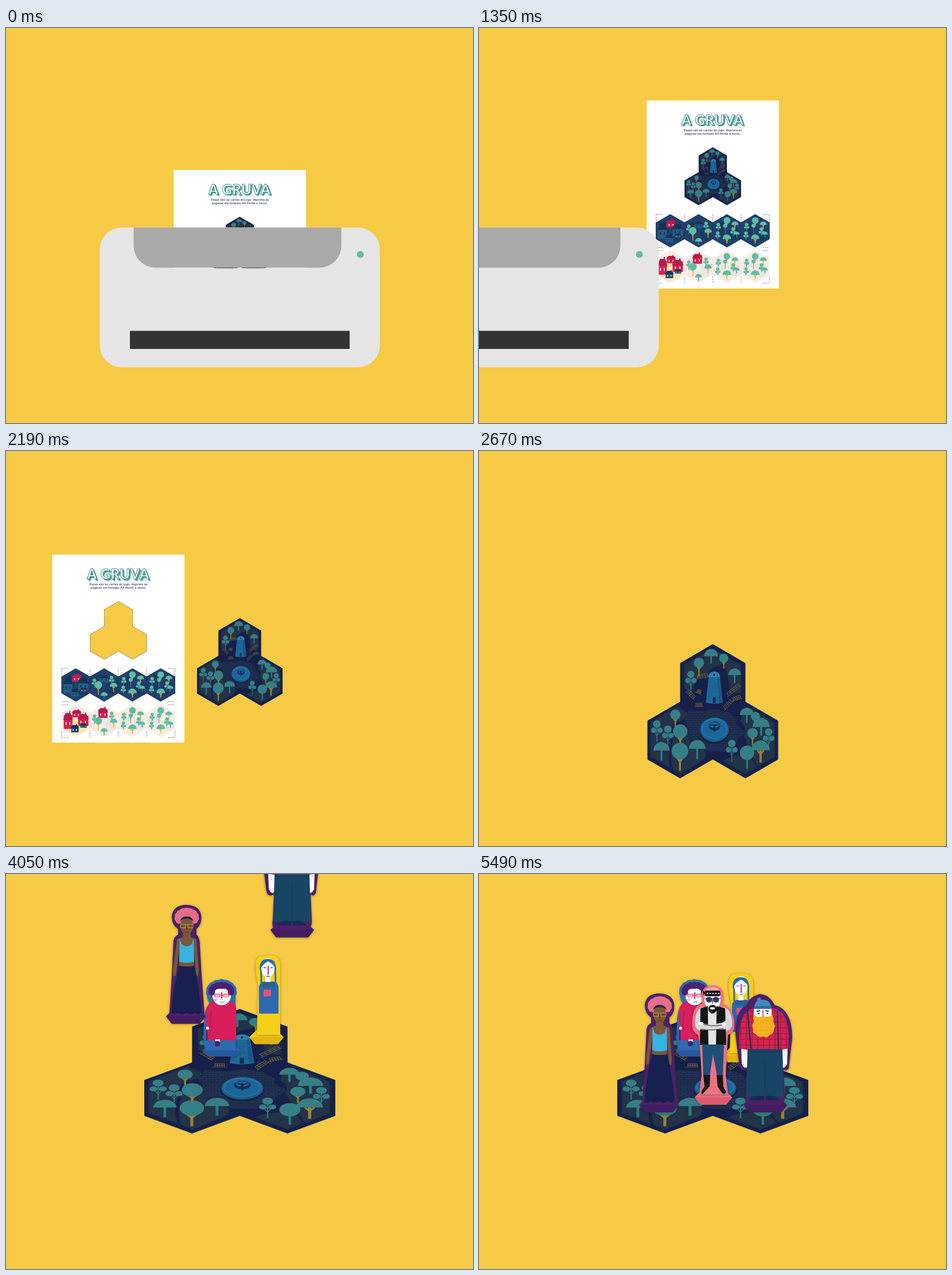
An HTML page with a canvas that plays this animation: 814x688 px, repeating every 5520 ms.

```html
<!DOCTYPE html>
<html lang="pt">
<head>
<meta charset="utf-8">
<title>Cartas do jogo</title>
<style>
html, body { margin: 0; width: 100%; height: 100%; overflow: hidden; background: #f6ca45; }
canvas { display: block; width: 814px; height: 688px; }
</style>
</head>
<body>
<canvas id="stage"></canvas>
<script>
const W = 814, H = 688, LOOP = 5520, STEP = 30;
const canvas = document.getElementById('stage');
const c = canvas.getContext('2d');
const dpr = window.devicePixelRatio || 1;
canvas.width = W * dpr;
canvas.height = H * dpr;

const YELLOW = '#f6ca45', NAVY = '#15204b', PURPLE = '#4b2069';

// ---------- helpers ----------
function ease(t, from, to) {
  const p = Math.min(1, Math.max(0, (t - from) / (to - from)));
  return p * p * (3 - 2 * p);
}
const mix = (a, b, p) => a + (b - a) * p;

function at(x, y, sx, sy, draw) {
  c.save();
  c.translate(x, y);
  c.scale(sx, sy);
  draw();
  c.restore();
}
function fill(color, d) {
  c.fillStyle = color;
  c.fill(new Path2D(d));
}
function line(color, width, d) {
  c.strokeStyle = color;
  c.lineWidth = width;
  c.stroke(new Path2D(d));
}
function oval(color, x, y, rx, ry = rx) {
  c.fillStyle = color;
  c.beginPath();
  c.ellipse(x, y, rx, ry, 0, 0, 7);
  c.fill();
}
function rect(color, x, y, w, h, r = 0) {
  c.fillStyle = color;
  c.beginPath();
  c.roundRect(x, y, w, h, r);
  c.fill();
}

// ---------- trees and houses ----------
// each tree: kind, x, y, radius, foot of the trunk, golden trunk
function trees(list, leaf, teal, gold) {
  for (const [kind, x, y, r, foot, golden] of list) {
    const w = Math.max(1, r * 0.24);
    const base = y + r * (kind === 'dome' ? .29 : .85);
    rect(golden ? gold : teal, x - w / 2, y, w, foot - y);
    if (golden) line(gold, w * .7, `M${x - r * .35} ${base}L${x} ${base + r * .45}L${x + r * .35} ${base}`);
    if (kind === 'dome') {
      fill(leaf, `M${x - r} ${base}A${r} ${r * 1.05} 0 0 1 ${x + r} ${base}Z`);
    } else {
      oval(leaf, x, y, r);
    }
    if (kind === 'trio') {
      line(teal, w * .7, `M${x - r * .8} ${y + r * 1.8}Q${x} ${y + r * 3.4} ${x} ${y + r * 3}Q${x} ${y + r * 3.4} ${x + r * .8} ${y + r * 1.8}`);
      oval(leaf, x - r * .85, y + r * 1.7, r * .72);
      oval(leaf, x + r * .85, y + r * 1.7, r * .72);
    }
  }
}
function house(x, y, w, h, wall, roof, pane) {
  rect(wall, x, y, w, h);
  fill(roof, `M${x - 1} ${y + h * .35}L${x + w * .2} ${y - h * .15}H${x + w * .8}L${x + w + 1} ${y + h * .35}Z`);
  rect(roof, x + w * .65, y - h * .3, w * .12, h * .3);
  rect(pane, x + w * .2, y + h * .5, w * .12, h * .22);
  rect(pane, x + w * .65, y + h * .5, w * .12, h * .22);
}

// ---------- three-hexagon board, centred on 0,0 ----------
const BOARD = 'M0 -116.5L56.7 -83.5V-16.5L113.5 16.5V83.5L56.7 116.5L0 83.5L-56.7 116.5L-113.5 83.5V16.5L-56.7 -16.5V-83.5Z';
const GROVE_TOP = [
  ['dome', -3, -99, 12, -83], ['disc', 19, -92, 8, -74, 1], ['disc', -24, -84, 9, -61, 1],
  ['trio', -38, -64, 6.3, -33], ['dome', 38, -66, 11, -49]
];
const GROVE_LEFT = [
  ['trio', -97, 22, 6.5, 53], ['trio', -78, 31, 6.5, 58], ['disc', -65, 6, 9, 29, 1],
  ['disc', -56.5, 35, 12.5, 60, 1], ['dome', -89, 64, 14, 86], ['dome', -27, 61, 14.5, 83],
  ['disc', -57, 69, 14.5, 103, 1]
];
const GROVE_RIGHT = [
  ['dome', 59, 3, 12, 20], ['disc', 74, 9, 8, 28, 1], ['dome', 84, 23, 15, 42],
  ['disc', 69, 38, 9, 59, 1], ['trio', 97, 36, 6.5, 59], ['trio', 33, 56, 6.5, 88],
  ['dome', 83, 63, 16, 89, 1], ['disc', 59.5, 72, 12.5, 100]
];
// fallen sails: x, y, angle, length
const SAILS = [[-18, -61, -.15, 18], [36, -37, -.65, 26], [26, -12, -.8, 17], [42, -23, -.3, 13],
  [-24, -11, 0, 11], [-38, -29, .75, 16], [-24, -34, .4, 7]];

function sail([x, y, angle, len]) {
  c.save();
  c.translate(x, y);
  c.rotate(angle);
  let d = `M${-len / 2 - 3} 3H${len / 2 + 2}M${-len / 2} 0H${len / 2}M${-len / 2} -3H${len / 2}`;
  for (let i = 0; i < 5; i++) d += `M${len * (i / 4 - .5)} -3V3`;
  line('#7d692f', .8, d);
  c.restore();
}

function bricks() {
  c.save();
  c.clip(new Path2D('M-42 -2L-18 0L6 -4L28 2L42 14L40 22L56 36L44 48L40 58L20 70L-10 70L-28 52L-46 48L-44 26L-50 14Z'));
  rect('#223150', -60, -10, 130, 90);
  let d = '';
  for (let y = -4, row = 0; y < 74; y += 4, row++) {
    d += `M-60 ${y}H60`;
    for (let x = -58 + row % 2 * 4; x < 60; x += 8) d += `M${x} ${y}v4`;
  }
  line('#182549', .7, d);
  c.restore();
}

function board() {
  fill(NAVY, BOARD);
  fill('#233348', 'M-50 -80L0 -109L20 -97L14 -80Q0 -78 -10 -66Q-30 -58 -34 -40Q-44 -30 -49 -42Z');
  fill('#233348', 'M23 -95L49 -80V-32Q40 -28 30 -38Q26 -66 20 -76Z');
  fill('#233348', 'M-108 19L-62 -9L-46 2Q-42 10 -54 16Q-74 18 -72 46Q-80 70 -74 98L-108 79Z');
  fill('#233348', 'M-66 30Q-56 18 -46 36L-40 52L-24 56Q-6 70 -16 84L-56 109L-70 100Q-76 70 -66 30Z');
  fill('#233348', 'M52 -4L60 -8L107 19V79L78 96Q60 60 54 40Q60 28 48 18Z');
  fill('#233348', 'M22 84Q40 72 66 80L76 97L57 109L18 86Z');
  bricks();
  SAILS.forEach(sail);

  // tower
  fill('#1c6797', 'M-7 -62H12L17.5 -15Q2 -11 -12 -15Z');
  fill('#2c83ad', 'M-8 -59A10.5 10 0 0 1 13 -59Z');
  fill('#19598a', 'M11 -59L17.5 -15L11 -14L8 -59Z');
  rect('#14305b', 0, -25, 5, 11, [2, 2, 0, 0]);
  rect('#14305b', 1, -65, 3, 4, 1);
  line('#134d78', .7, 'M-6 -50H-2M3 -46H7M-7 -38H-3M4 -34H8M-8 -26H-4M-2 -42H1M7 -24H11');

  // fountain
  oval('#10264a', 3, 35, 26, 22);
  oval('#1b5d8c', 3, 32, 25, 21);
  oval('#2473a0', 3, 30, 23, 18.5);
  oval('#1b6699', 3, 30.5, 20.5, 16);
  oval('#12335f', 3, 26, 10, 8);
  oval('#25749f', 3, 24, 8, 4.5);
  line('#0f274d', 2, 'M3 22V36M-4 24Q3 22 3 30Q3 22 10 24');

  for (const grove of [GROVE_TOP, GROVE_LEFT, GROVE_RIGHT]) trees(grove, '#367f87', '#2f7982', '#98842f');
}

// ---------- printed sheet ----------
const HEX = 'M0 -28.5L24.7 -14.2V14.2L0 28.5L-24.7 14.2V-14.2Z';
const VILLAGE = [['trio', -17, -8, 3, 6], ['disc', -10, 0, 6.5, 17, 1], ['dome', 16.5, 1, 6.5, 12, 1], ['dome', 0, 17, 6, 25], ['trio', 13, -13, 3, -2]];
const WOOD = [['disc', 0, -18, 5.8, -8, 1], ['trio', -15, -11, 3, 0], ['dome', 14, -12, 6, -3, 1], ['disc', -3, -9, 3.5, 4],
  ['trio', -16, 4, 3, 15], ['trio', 11, -3, 3.2, 9], ['dome', 17, 5, 5, 12], ['dome', 0, 12, 7.5, 22, 1]];

function tile(index, night) {
  fill(night ? '#20416b' : '#f7ece3', HEX);
  if (night) line('#18335b', 1, HEX);
  const patch = night ? '#1b3a63' : '#e8e7df';
  const leaf = '#5dbda4', gold = night ? '#c7ad43' : '#e3bd45';
  oval(patch, -11, -4, 9, 12);
  oval(patch, 12, 6, 10, 11);
  if (index === 0) {
    if (!night) oval('#f9e6b4', 0, 4, 22, 20);
    const blue = ['#285d86', '#153454', '#143252'], red = ['#d71f57', '#b51a4b', '#f7e6e2'];
    const main = night ? blue : red;
    house(-6, -17, 15, 11, ...red);
    house(-21, -10, 15, 24, ...main);
    house(4, -9, 18, 18, ...main);
    house(-8, 9, 13, 11, ...(night ? blue : ['#1f4c70', '#153450', '#fff']));
    house(8, 6, 11, 6, '#245478', '#16344f', '#9cc');
  } else if (index === 1) {
    if (night) house(-8, -15, 16, 10, '#28587f', '#153454', '#143252');
    else house(-10, -20, 16, 15, '#d71f57', '#b51a4b', '#f7e6e2');
    trees(VILLAGE, leaf, '#3f9c91', gold);
  } else {
    trees(WOOD, leaf, '#3f9c91', gold);
  }
}

function sheet(cut) {
  rect('#fff', 0, 0, 230.5, 327.5);

  c.textAlign = 'center';
  c.lineJoin = 'round';
  c.font = '800 24px Lato, "Open Sans", sans-serif';
  c.letterSpacing = '0.4px';
  const title = 'A GRUVA';
  c.fillStyle = '#46a597';
  for (let i = 3; i > 0; i--) c.fillText(title, 115.5 + i * .7, 43 + i * .7);
  c.fillStyle = '#fff';
  c.fillText(title, 115, 42.5);
  c.strokeStyle = '#3b7f83';
  c.lineWidth = .9;
  c.strokeText(title, 115, 42.5);

  c.letterSpacing = '0px';
  c.font = '500 5.3px Inter, "Open Sans", sans-serif';
  c.fillStyle = '#2c3550';
  c.fillText('Essas são as cartas do jogo. Imprima as', 115.5, 53.6);
  c.fillText('páginas em formato A4 frente e verso.', 115.5, 59.8);

  if (cut) at(115.5, 132, .434, .434, () => {
    fill(YELLOW, BOARD);
    line('#8c8347', 1.8, BOARD);
  });

  c.setLineDash([2.5, 1.5]);
  let marks = 'M17 198.5H29M202 198.5H214M17 256H29M202 256H214M17 261.5H29M202 261.5H214M17 318.5H29M202 318.5H214';
  for (let i = 0; i < 5; i++) marks += `M${16.5 + i * 49.35} 198.5v17m0 91v12`;
  line('#66686d', .8, marks);
  c.setLineDash([]);

  for (let row = 0; row < 2; row++)
    for (let i = 0; i < 4; i++) at(41.2 + i * 49.35, 227 + row * 62.5, 1, 1, () => tile(i, row === 0));
}

// ---------- printer ----------
function printerBody() {
  rect('#e5e5e5', 163.5, 347.5, 488, 243.5, 38);
}
function printerFront() {
  rect('#a9a9a9', 222.5, 347.5, 362, 70, [0, 0, 38, 38]);
  rect('#333', 216, 527.5, 383, 31.5);
  rect('#777', 216, 527.2, 383, 1);
  oval('#5fbca5', 617.5, 394.5, 6);
}

// ---------- standing figures ----------
// foot: left, right, top, middle, bottom of the faceted base
function standee(color, side, outline, [l, r, top, mid, bottom]) {
  c.save();
  c.lineJoin = 'round';
  c.shadowColor = 'rgba(40,30,40,.45)';
  c.shadowBlur = 4;
  c.shadowOffsetY = 1;
  fill(color, `M${l} ${mid}L${l + 13} ${top}H${r - 13}L${r} ${mid}L${r - 10} ${bottom}H${l + 10}Z`);
  fill(color, outline);
  c.restore();
  fill(side, `M${l} ${mid}H${r}L${r - 10} ${bottom}H${l + 10}Z`);
}
// a crown of round locks over the top of a head
function locks(color, x, y, rx, ry, r) {
  for (let i = 0; i < 9; i++) {
    const a = Math.PI * (.95 + i * .1375);
    oval(color, x + rx * Math.cos(a), y + ry * Math.sin(a), r);
  }
}

function curly() {
  standee('#2d6bb0', '#2759a0',
    'M350 203Q352 190 362 188Q376 181 390 187Q400 193 400 206V312H349Q343 300 345 262Q345 235 355 226Q349 216 350 203Z',
    [342, 410, 298, 307, 318]);
  locks('#2d6bb0', 375.5, 205, 18, 13, 9);
  rect('#d81e5b', 349, 222, 52, 68, [16, 12, 4, 6]);
  line('#ab1650', 1, 'M358 238Q355 255 355 274');
  oval('#fff', 376, 212, 16, 16.5);
  locks('#4c2173', 375.5, 204, 17, 10.5, 5.8);
  fill('#4c2173', 'M358 205Q362 192 376 192Q391 192 393 205Q385 199 376 200Q366 199 358 205Z');
  line('#d81e5b', .9, 'M360 211H391M364 209h9v5h-9ZM379 209h9v5h-9Z');
  line('#d8235c', 2.2, 'M376 206V217');
  oval('#f3b8c4', 365, 219, 3, 2.4);
  line('#333', .8, 'M373 223h7');
  rect('#fff', 365, 288, 8, 8);
  rect('#4c2173', 364, 291, 9, 9, 3);
  rect('#fff', 349, 266, 5, 5, 2);
  line('#4c2173', 2.5, 'M350 272V290');
}

function braids() {
  standee('#f7cf16', '#e3b30f',
    'M435 189Q435 174 450 173.5H463Q478 175 478 190V312H437L440 226Q435 210 435 189Z',
    [424, 484, 303, 316, 328]);
  rect('#2c69b0', 441, 219, 34, 56, [10, 10, 2, 2]);
  line('#2c69b0', 2.8, 'M444.5 192L445 222M469 192L470 222');
  oval('#fff', 456.5, 195, 11.5, 17);
  rect('#fff', 452, 208, 9, 12);
  fill('#2c69b0', 'M442.5 200Q440 180 456.5 179.5Q472 180 470.5 200Q469 190 457 184Q446 189 442.5 200Z');
  line('#d8235c', 2, 'M457 192V207');
  line('#23395f', 1.2, 'M449 195h4M461 195h4M454 210h6');
  rect('#276097', 447, 220, 22, 9, 3);
  rect('#e25574', 449, 233, 13, 12, 1);
}

function longSkirt() {
  standee(PURPLE, '#441c61',
    'M289 228Q291 208 315 208Q339 209 340.5 229Q341 243 332 250V260Q338 264 338 280L341 330L346 396Q347 404 338 408H290Q283 404 285 394L289 332L292 270Q294 262 300 260V250Q289 243 289 228Z',
    [279, 348, 390, 402, 415]);
  locks('#e86d87', 315, 230, 15.5, 11, 6);
  oval('#e86d87', 315, 225, 16, 12);
  oval('#e86d87', 302, 236, 6, 5);
  oval('#e86d87', 328, 236, 6, 5);
  fill('#7b5638', 'M309 255H321L322 264L332 268L336 322L335 333L331 330L328 285V315H302V285L296 331L292 333L291 322L298 268L308 264Z');
  oval('#7b5638', 315, 244.5, 11, 15.5);
  fill('#24214f', 'M303 237Q305 228 315 228Q325 228 327 237Q322 232 315 232Q308 232 303 237Z');
  line('#cda044', .9, 'M304 242h9v6h-9ZM317 242h9v6h-9ZM313 243h4');
  line('#47301f', 1.1, 'M306 245h4M319 245h4M315 243V252M312 256h6');
  fill('#36b4df', 'M302.5 266L306 276Q315 284 324 276L327 266L328 307Q315 311 302 307Z');
  fill('#17204e', 'M302 314Q315 317 328 314Q335 340 341 396Q335 400 329 396Q322 401 315 396Q306 401 300 396Q293 400 288 396Q292 350 302 314Z');
}

function beard() {
  standee(PURPLE, '#441c61',
    'M447 280Q446 238 466 229Q473 212 490 209Q507 211 515 228Q546 236 546 285L540 338Q536 345 531 340L533 385Q534 402 520 404H472Q462 400 465 384L467 340Q458 346 454 336Z',
    [461, 537, 391, 402, 415]);
  fill('#fff', 'M457 300H469L470 333Q464 343 458 331ZM526 300H538L537 331Q531 343 526 333Z');
  line('#e0aa45', .8, 'M459 308h4M461 314h3M532 308h4M531 315h3');
  c.save();
  c.clip(new Path2D('M454 304Q450 248 472 236Q495 228 520 236Q544 247 539 304L528 306H466Z'));
  rect('#d8224f', 450, 228, 94, 80);
  let d = '';
  for (let i = 0; i < 9; i++) d += `M${456 + i * 10} 228V308M450 ${238 + i * 10}H544`;
  line('rgba(120,22,68,.45)', 2, d);
  c.restore();
  line('#25305c', 2.4, 'M468 238L474 306M520 238L522 306');
  fill('#184566', 'M468 305H529L531 388H466Z');
  line('#143756', 1, 'M498 322L499 388M470 309H527');
  fill('#182b50', 'M472 394Q474 384 497 387V394ZM500 394V387Q520 384 523 394Z');
  rect('#fff', 479, 230, 31, 28, 8);
  fill('#4489b7', 'M480 234Q479 219 494 219Q509 219 509 234Z');
  rect('#2d6d9f', 479, 230, 31, 5, 2);
  oval('#4489b7', 488, 219, 3.5);
  line('#2b3656', 1.8, 'M484 239l6 -1M499 238l6 1M486 243h3M501 243h3');
  line('#e27489', 2.5, 'M495 237V249');
  fill('#f5b31e', 'M479 245Q486 251 495 248Q504 251 511 245Q514 252 513 258Q518 264 514 270Q514 279 507 280Q502 287 495 283Q487 286 483 279Q476 278 478 270Q474 264 479 257Q477 250 479 245Z');
  let curls = '';
  for (let y = 254; y < 280; y += 6) for (let x = 482 + y % 4; x < 509; x += 6) curls += `M${x} ${y}q2 2 3 0`;
  line('#e5a01f', .9, curls);
}

function vest() {
  standee('#ef7280', '#dd5a6d',
    'M388 216Q386 195 407 194Q427 195 426 216L425 227Q444 231 445 262Q446 276 434 280L430 350L434 384H384L388 350L385 300L382 280Q370 276 372 256Q372 230 389 226Z',
    [376, 441, 376, 389, 402]);
  oval('#fff', 407, 218, 14, 19.5);
  oval('#f3a7ac', 407, 202, 11.5, 5);
  fill('#d8d8da', 'M388 232H427Q440 236 441 258Q441 273 428 274L382 272Q375 266 377 254Q378 236 388 232Z');
  fill('#151517', 'M386 234L399 230L400 298H385ZM414 230L429 234L431 298H413Z');
  fill('#e4e4e5', 'M399 232H414L413 298H400Z');
  fill('#d8d8da', 'M378 254Q392 264 408 262L424 259L440 250L441 266Q430 273 412 270Q390 275 379 268Z');
  line('#27272a', 1, 'M384 259Q402 267 424 263M386 270Q404 274 426 269');
  rect('#fff', 383, 258, 8, 5, 2);
  rect('#fff', 424, 260, 7, 5, 2);
  rect('#17171a', 393.5, 203, 27, 10, 3);
  fill('#17171a', 'M394 206L390 202L391 212Z');
  c.fillStyle = '#fff';
  for (let x = 397; x < 420; x += 5) c.fillRect(x, 207, 2, 2);
  oval('#1e456d', 401, 219, 5.5, 5);
  oval('#1e456d', 413, 219, 5.5, 5);
  line('#25252a', 1, 'M393 217H421');
  line('#d94a68', 2, 'M407 217V226');
  fill('#17171a', 'M400 237Q399 228 407 228Q415 228 414 237Q412 243 407 243Q402 243 400 237Z');
  rect('#fff', 403, 232, 8, 4, 2);
  fill('#1d4f78', 'M389 297H427L425 352H415L408 314L402 352H391Z');
  fill('#18181b', 'M391 350H403L402 370L390 383Q386 384 388 378L393 370ZM414 350H425L426 370L431 380Q428 385 424 382L416 371Z');
}

// figure, moment it starts to drop
const CAST = [[curly, 3600], [braids, 3700], [longSkirt, 3800], [beard, 3900], [vest, 4020]];

// ---------- timeline ----------
function render(t) {
  c.setTransform(dpr, 0, 0, dpr, 0, 0);
  rect(YELLOW, 0, 0, W, H);

  const rise = Math.pow(Math.max(0, 1 - t / 1011), 1.26);
  const swap = ease(t, 1011, 1689);
  const grow = ease(t, 1807, 2707);
  const flat = ease(t, 2750, 3670);

  const paperX = 292.2 - 544 * grow;
  const paperY = 72 + 175.3 * rise + 108.5 * swap;
  const size = mix(.434, 1.007, grow);
  const boardY = mix(mix(paperY + 132, 454, grow), 343.5, flat);

  const prints = () => {
    at(paperX, paperY, 1, 1, () => sheet(grow > 0));
    at(407.5, boardY, mix(size, 1.467, flat), mix(size, .931, flat), board);
  };
  prints();

  if (swap < 1) at(-676 * swap, 0, 1, 1, () => {
    printerBody();
    if (swap === 0) {
      // hairline of the sheet under the tray
      c.save();
      c.beginPath();
      c.rect(222, 410, 362, 8.2);
      c.clip();
      prints();
      c.restore();
    }
    printerFront();
  });

  for (const [figure, start] of CAST) {
    if (t > start) at(0, -430 * (1 - ease(t, start, start + 420)), 1, 1, figure);
  }
}

const begin = performance.now();
function tick() {
  const t = (performance.now() - begin) % LOOP;
  render(Math.floor(t / STEP) * STEP);
  requestAnimationFrame(tick);
}
tick();
</script>
</body>
</html>
```
